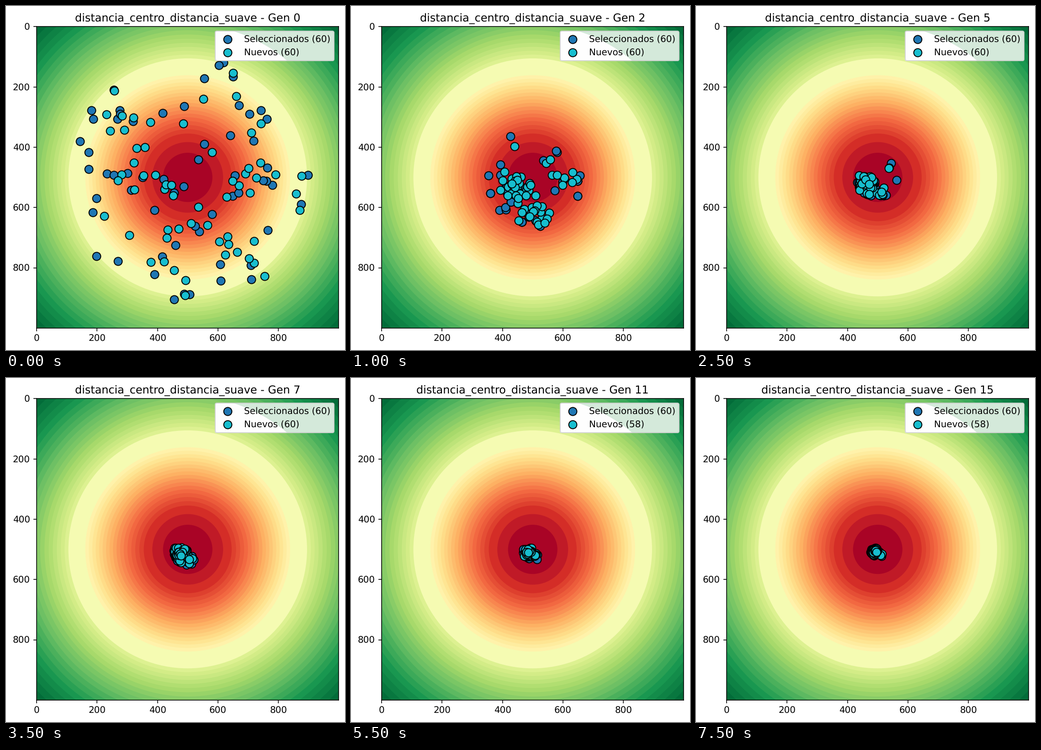
Animation of 742x755 px, one loop 8 s. Source, as a matplotlib script:

```python
import numpy as np
import matplotlib.pyplot as plt
from matplotlib.animation import FuncAnimation
from matplotlib.patches import Circle, FancyBboxPatch

W, H, DPI = 742, 755, 143.2
LEFT, TOP, SIDE = 66.6, 45.0, 661.6     # axes box in pixels, y down
SCALE = SIDE / 1000
GENS, STEP, SIZE = 16, 500, 60

# The map is d^2 / (d^2 + SOFT^2), scaled to reach 1 in the corners.
SOFT = 500
PEAK = 1 + SOFT ** 2 / (2 * 500 ** 2)
HUB = np.array([500, 504])


def level(d):
    return PEAK * d ** 2 / (d ** 2 + SOFT ** 2)


def distance(v):
    return SOFT * np.sqrt(v / (PEAK - v))


def reach(gen):
    """Distance to the hub within which points survive into a generation."""
    return 308 * gen ** -0.93 if gen else 410


def new_count(gen):
    return SIZE - (gen == 1) - 2 * (gen > 9)


def first_points(rng):
    angle = rng.uniform(0, 2 * np.pi, SIZE)
    r = reach(0) * np.sqrt(rng.uniform(0, 1, SIZE))
    return HUB + np.column_stack([r * np.cos(angle), r * np.sin(angle)])


def select(pool, gen, rng):
    inside = pool[np.hypot(*(pool - HUB).T) <= reach(gen)]
    return rng.choice(inside, SIZE, replace=len(inside) < SIZE)


def offspring(kept, gen, rng):
    """Children lie near a parent, pulled some way towards the hub."""
    n = new_count(gen)
    parents = rng.choice(kept, n)
    pull = rng.uniform(0.65, 1, (n, 1))
    return HUB + (parents - HUB) * pull + rng.normal(0, 0.08 * reach(gen), (n, 2))


def evolve():
    rng = np.random.default_rng(7)
    pool, steps = first_points(rng), []
    for gen in range(GENS):
        kept = select(pool, gen, rng)
        new = offspring(kept, gen, rng)
        steps.append((kept, new))
        pool = np.vstack([kept, new])
    return steps


def disc(r, color, z):
    return ax.add_patch(Circle((500, 500), r, fc=color, lw=0, zorder=z))


plt.rcParams["text.hinting"] = "none"
fig = plt.figure(figsize=(W / DPI + 1e-6, H / DPI + 1e-6), dpi=DPI)
ax = fig.add_axes([LEFT / W, 1 - (TOP + SIDE) / H, SIDE / W, SIDE / H])
ax.set(xlim=(-0.5, 999.5), ylim=(999.5, -0.5))
ax.set_xticks(range(0, 1000, 200))
ax.set_yticks(range(0, 1000, 200))

# Colour bands: wide in the deep red, one broad yellow, fine elsewhere.
edges = distance(np.r_[np.linspace(0, 0.117, 4),
                       np.linspace(0.117, 0.472, 17)[1:],
                       np.linspace(0.576, 1, 20)])
cmap = plt.get_cmap("RdYlGn")
for inner, outer in zip(edges[-2::-1], edges[:0:-1]):
    disc(outer + 2 * (outer > 700), cmap(level((inner + outer) / 2)), 0)

style = dict(s=80, edgecolors="black", linewidths=1)
kept_dots = ax.scatter([], [], c="tab:blue", label=f"Seleccionados ({SIZE})",
                       zorder=2, **style)
new_dots = ax.scatter([], [], c="tab:cyan", label=f"Nuevos ({SIZE})",
                      zorder=3, **style)
title = ax.set_title("")
legend = ax.legend(loc="upper right", framealpha=0.8)
legend.get_frame().set_facecolor("none")

# Two-tone tint behind the legend.
panel = ax.add_patch(FancyBboxPatch(
    (590, 14), 395, 100, boxstyle="round,pad=0,rounding_size=6",
    fc="#d4e9da", lw=0, zorder=4))
disc(508, "#fefefe", 4.1).set_clip_path(panel)

steps = evolve()


def draw(gen):
    kept, new = steps[gen]
    kept_dots.set_offsets(kept)
    new_dots.set_offsets(new)
    title.set_text(f"distancia_centro_distancia_suave - Gen {gen}")
    legend.get_texts()[1].set_text(f"Nuevos ({len(new)})")
    return kept_dots, new_dots, title, legend


anim = FuncAnimation(fig, draw, frames=GENS, interval=STEP, repeat=True,
                     repeat_delay=0)
plt.show()
```
